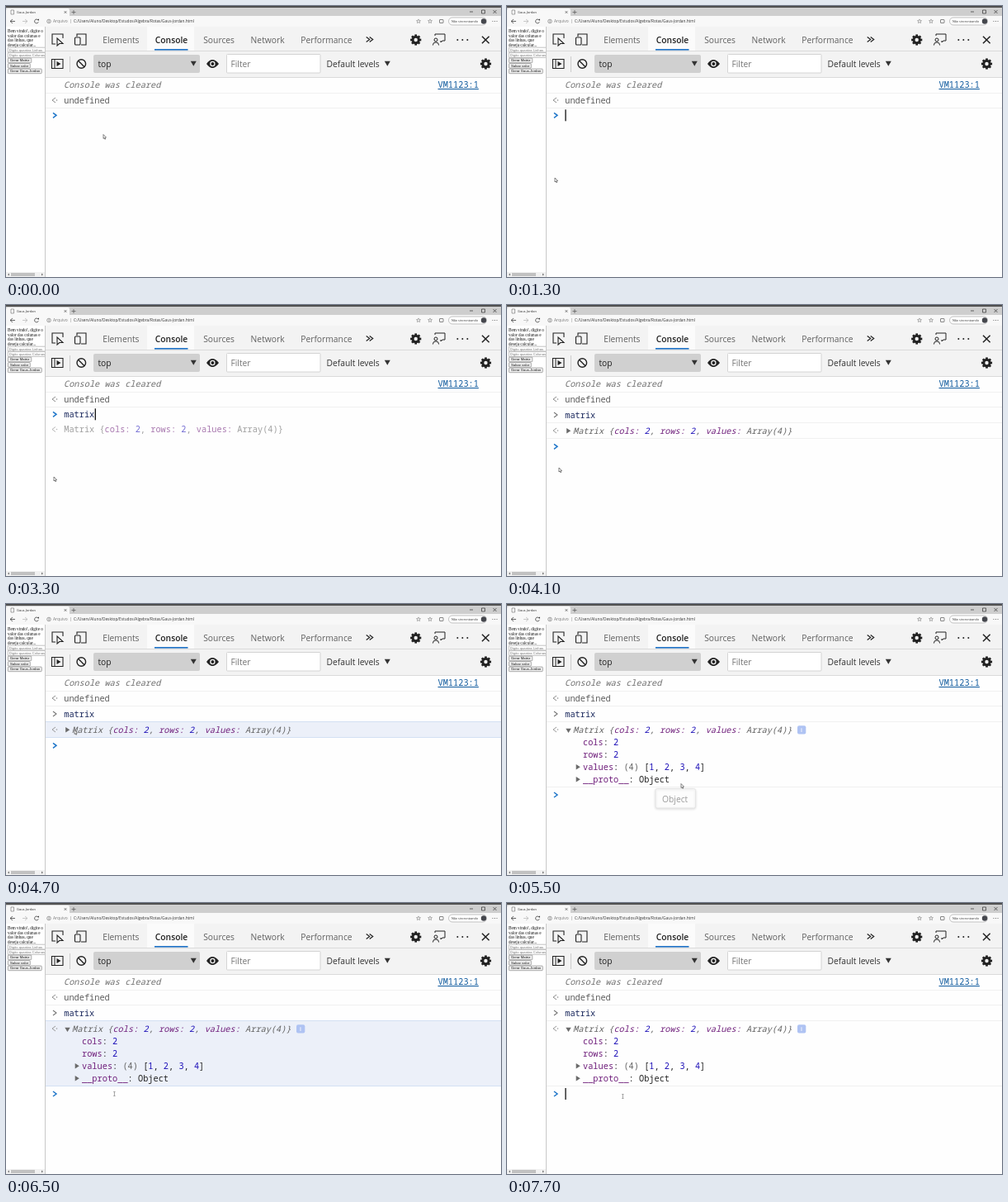
These frames come from a looping animation (600x328 px, 8 s). An HTML page with a canvas:

```html
<!DOCTYPE html>
<html lang="pt">
<head>
<meta charset="utf-8">
<title>Console</title>
<style>
html, body { margin: 0; width: 100%; height: 100%; overflow: hidden; background: #fff; }
canvas { display: block; width: 600px; height: 328px; }
</style>
</head>
<body>
<canvas id="stage" width="600" height="328"></canvas>
<script>
const ctx = document.getElementById('stage').getContext('2d');
const LOOP = 8000;
const SANS = '"Open Sans", "Noto Sans", sans-serif';
const FORM = '4.2px "Liberation Sans", sans-serif';
const SERIF = '5.2px "Liberation Serif", serif';
const MONO = '10.3px "Noto Sans Mono", "DejaVu Sans Mono", monospace';
const GREY = '#626262', DARK = '#222', PURPLE = '#70207c', BLUE = '#1d10b8';
const PROMPT = '#1f76c9', LINK = '#0f5a9e';

function rect(x, y, w, h, color) {
  ctx.fillStyle = color;
  ctx.fillRect(x, y, w, h);
}

function box(x, y, w, h, r, fill, stroke, width = 1) {
  ctx.beginPath();
  ctx.roundRect(x, y, w, h, r);
  if (fill) { ctx.fillStyle = fill; ctx.fill(); }
  if (stroke) { ctx.strokeStyle = stroke; ctx.lineWidth = width; ctx.stroke(); }
}

function line(points, color, width = 1, close = false) {
  ctx.beginPath();
  points.forEach(([x, y]) => ctx.lineTo(x, y));
  if (close) ctx.closePath();
  ctx.strokeStyle = color;
  ctx.lineWidth = width;
  ctx.stroke();
}

function poly(points, color) {
  ctx.beginPath();
  points.forEach(([x, y]) => ctx.lineTo(x, y));
  ctx.fillStyle = color;
  ctx.fill();
}

function circle(x, y, r, fill, stroke, width = 1) {
  ctx.beginPath();
  ctx.arc(x, y, r, 0, Math.PI * 2);
  if (fill) { ctx.fillStyle = fill; ctx.fill(); }
  if (stroke) { ctx.strokeStyle = stroke; ctx.lineWidth = width; ctx.stroke(); }
}

function text(str, x, y, font, color) {
  ctx.font = font;
  ctx.fillStyle = color;
  ctx.fillText(str, x, y);
  return x + ctx.measureText(str).width;
}

const mono = (str, x, y, color, italic) => text(str, x, y, (italic ? 'italic ' : '') + MONO, color);

function spans(x, y, parts, italic) {
  for (const [str, color] of parts) x = mono(str, x, y, color, italic);
  return x;
}

function cross(x, y, r, color, width) {
  line([[x - r, y - r], [x + r, y + r]], color, width);
  line([[x + r, y - r], [x - r, y + r]], color, width);
}

function gear(x, y) {
  for (let i = 0; i < 4; i++) {
    const a = i * Math.PI / 4, dx = Math.cos(a) * 6.6, dy = Math.sin(a) * 6.6;
    line([[x - dx, y - dy], [x + dx, y + dy]], DARK, 2.7);
  }
  circle(x, y, 5.2, DARK);
  circle(x, y, 2.2, '#f3f3f3');
}

function chevron(x, y, color, width = 1.1, dir = 1) {
  line([[x - 2 * dir, y - 3], [x + 2 * dir, y], [x - 2 * dir, y + 3]], color, width);
}

function resultMark(y, color) {
  chevron(58, y, color, 1, -1);
  circle(61.5, y, 0.8, color);
}

function triangle(x, y, open) {
  poly(open ? [[x - 3.2, y - 2.3], [x + 3.2, y - 2.3], [x, y + 3]]
            : [[x - 2.3, y - 3.2], [x + 2.8, y], [x - 2.3, y + 3.2]], '#6a6a6a');
}

function dropArrow(x, y) {
  poly([[x - 3.5, y - 3], [x + 3.5, y - 3], [x, y + 3]], '#333');
}

function divider(y, color = '#f0f0f0') { rect(48, y, 552, 1, color); }

function drawBrowser() {
  rect(0, 0, 600, 12, '#cecece');
  rect(0, 0, 600, 2, '#505050');
  box(0, 3, 77, 10, [2, 2, 0, 0], '#f8f8f8');
  box(6, 5, 3.5, 5, 0, '#fff', '#666', 0.6);
  text('Gaus-Jordan', 13, 9.3, '4px ' + SANS, '#333');
  cross(72, 7.5, 1.3, '#444', 0.7);
  line([[79.5, 7.5], [84.5, 7.5]], '#555', 0.7);
  line([[82, 5], [82, 10]], '#555', 0.7);
  line([[562, 7], [566, 7]], '#333', 0.7);
  box(576.5, 5, 4, 4, 0, null, '#333', 0.7);
  cross(592.5, 7, 2, '#333', 0.7);

  rect(0, 12, 600, 13, '#f8f8f8');
  for (const [x, dir, color] of [[8, 1, '#444'], [23, -1, '#bbb']]) {
    line([[x - 3, 18.5], [x + 3, 18.5]], color, 0.8);
    line([[x, 16], [x - 3 * dir, 18.5], [x, 21]], color, 0.8);
  }
  ctx.beginPath();
  ctx.arc(37, 18.5, 2.4, 0.3, 5.6);
  ctx.strokeStyle = '#444';
  ctx.lineWidth = 0.8;
  ctx.stroke();
  poly([[37.7, 16.8], [40, 15.4], [40, 17.8]], '#444');
  circle(52, 18.5, 2.3, null, '#666', 0.6);
  rect(51.7, 17.2, 0.7, 2.6, '#666');
  text('Arquivo', 57, 20.2, '4.9px ' + SANS, '#777');
  rect(78, 16, 0.6, 5, '#aaa');
  text('C:/Users/Aluno/Desktop/Estudos/Algebra/Rotas/Gaus-Jordan.html', 82, 20.2, '4.75px ' + SANS, '#333');

  const star = (x, y, r) => line(Array.from({ length: 10 }, (_, i) => {
    const a = -Math.PI / 2 + i * Math.PI / 5, k = i % 2 ? r * 0.45 : r;
    return [x + Math.cos(a) * k, y + Math.sin(a) * k];
  }), '#666', 0.5, true);
  star(500, 18.5, 2.6);
  star(514, 18.5, 2.6);
  box(525.5, 16.5, 4.5, 4, 0.5, null, '#555', 0.7);
  box(536.5, 14, 46, 9, 4.5, '#fff', '#999', 0.6);
  text('Não sincronizando', 540, 19.9, '3.7px ' + SANS, '#333');
  circle(579, 18.5, 3.2, '#45474d');
  for (const x of [590, 592.5, 595]) circle(x, 18.5, 0.5, '#444');
}

function drawPage() {
  ctx.save();
  ctx.beginPath();
  ctx.rect(0, 25, 47, 303);
  ctx.clip();
  rect(0, 25, 47, 303, '#fff');
  ['Bem vindo!, digite o', 'valor das colunas e', 'das linhas, que', 'deseja calcular...']
    .forEach((str, i) => text(str, 2, 32 + i * 5.6, SERIF, '#111'));
  ['Digito quantas Linhas', 'Digito quantas Colunas'].forEach((str, i) => {
    const y = 50.2 + i * 6.4;
    box(2.3, y, 60, 5.8, 0, '#fff', '#999', 0.6);
    text(str, 3.8, y + 4.4, FORM, '#777');
  });
  [['Gerar Matriz', 28.5], ['Salvar valor', 27], ['Gerar Gaus-Jordan', 41]].forEach(([str, w], i) => {
    const y = 63.1 + i * 6.5;
    box(2.3, y, w, 5.6, 1, '#efefef', '#777', 0.6);
    text(str, 5, y + 4.3, FORM, '#111');
  });
  rect(0, 322, 47, 6, '#f1f1f1');
  rect(6, 323, 29, 4, '#c1c1c1');
  poly([[2, 325], [4, 323.5], [4, 326.5]], '#777');
  poly([[45, 325], [43, 323.5], [43, 326.5]], '#777');
  ctx.restore();
  rect(47, 25, 1, 303, '#c9c9c9');
}

function drawToolbars() {
  rect(48, 25, 552, 61, '#f3f3f3');
  rect(171, 25, 57, 29, '#fbfbfb');
  rect(48, 54, 552, 1, '#dadada');
  rect(48, 86, 552, 1, '#dadada');
  rect(180, 52, 40.5, 1.6, '#1a6fc4');

  line([[60, 46], [56, 46], [56, 34], [69, 34], [69, 39]], DARK, 1.1);
  line([[62, 39], [62, 48], [64.8, 45.5], [69, 45.5]], DARK, 1.1, true);
  line([[86, 37], [86, 34], [97, 34], [97, 47], [91, 47]], DARK, 1.1);
  box(83.5, 38, 6.5, 9, 1, null, DARK, 1.1);

  const tabFont = '10.3px ' + SANS;
  [['Elements', 117.2], ['Sources', 239.2], ['Network', 296.6], ['Performance', 357.2]]
    .forEach(([str, x]) => text(str, x, 44.8, tabFont, '#606060'));
  text('Console', 180.8, 44.8, '600 ' + tabFont, DARK);
  for (const x of [438.7, 442.7]) chevron(x, 40.5, DARK, 1.2);

  gear(496.7, 41);
  circle(521, 41, 2, null, DARK);
  ctx.beginPath();
  ctx.arc(521, 47.5, 3.6, Math.PI, 0);
  ctx.stroke();
  line([[520, 36], [520, 34], [532, 34], [532, 42], [529, 42], [527, 44], [527, 42]], DARK);
  for (const x of [547.3, 553.3, 559.3]) circle(x, 41, 1, DARK);
  cross(581.3, 41, 4.3, DARK, 1.5);

  box(55.5, 64.5, 13.5, 11, 0, null, DARK, 1.1);
  rect(58.5, 64.5, 1, 11, DARK);
  poly([[61.5, 67], [66.5, 70], [61.5, 73]], DARK);
  rect(77, 61, 1, 19, '#ccc');
  circle(91.3, 70, 5.3, null, DARK, 1.4);
  line([[87.6, 66.3], [95, 73.7]], DARK, 1.4);

  box(106, 59, 129, 22, 2, '#d0d0d0');
  text('top', 111.4, 74, tabFont, DARK);
  dropArrow(227.3, 69.8);
  ctx.beginPath();
  ctx.moveTo(243, 70);
  ctx.quadraticCurveTo(250, 60, 258, 70);
  ctx.quadraticCurveTo(250, 80, 243, 70);
  ctx.fillStyle = DARK;
  ctx.fill();
  circle(250.4, 70, 3.2, '#f3f3f3');
  circle(250.4, 70, 1.9, DARK);
  box(267.5, 58.5, 113.5, 22.5, 1, '#fff', '#d4d4d4');
  text('Filter', 272.4, 74, tabFont, '#757575');
  text('Default levels', 388.4, 74, tabFont, '#333');
  dropArrow(462.3, 69.8);
  gear(581.5, 70);
}

const summary = [
  ['Matrix {', GREY], ['cols:', PURPLE], [' ', GREY], ['2', BLUE], [', ', GREY], ['rows:', PURPLE],
  [' ', GREY], ['2', BLUE], [', ', GREY], ['values:', PURPLE], [' Array(4)}', GREY],
];

function drawDetails() {
  triangle(74.5, 153, true);
  box(352, 147.3, 10.3, 10.3, 2, '#afc3f3');
  text('i', 356, 155.4, '600 7px ' + SANS, '#fff');
  spans(92, 170.8, [['cols', PURPLE], [': ', DARK], ['2', BLUE]]);
  spans(92, 185.8, [['rows', PURPLE], [': ', DARK], ['2', BLUE]]);
  triangle(86, 197.3);
  spans(92, 201.1, [['values', PURPLE], [': ', DARK], ['(4)', GREY], [' [', DARK], ['1', BLUE], [', ', DARK],
    ['2', BLUE], [', ', DARK], ['3', BLUE], [', ', DARK], ['4', BLUE], [']', DARK]]);
  triangle(86, 212.3);
  spans(92, 216, [['__proto__', PURPLE], [': Object', DARK]]);
}

const within = (t, ...spansMs) => spansMs.some(([a, b]) => t >= a && t < b);
const keyTimes = [2100, 2200, 2300, 2700, 2800, 3000];

function drawConsole(t, promptY) {
  rect(48, 87, 552, 241, '#fefefe');
  mono('Console was cleared', 70, 99, '#707070', true);
  const linkEnd = mono('VM1123:1', 523.5, 99, LINK);
  rect(523.5, 100, linkEnd - 523.5, 1, LINK);
  divider(105);
  resultMark(114, '#8a8a8a');
  mono('undefined', 70.2, 118, '#5c5c5c');
  divider(123);

  const evaluated = t >= 3400, expanded = t >= 4800;
  let caretX = 71;
  if (evaluated) {
    chevron(59, 133, '#777');
    mono('matrix', 70.2, 137, '#1c2a5e');
    const bottom = expanded ? 221 : 161;
    const hover = within(t, [4500, 5400], [5800, 6600]);
    if (hover) rect(48, 142, 552, bottom - 142, '#ecf0f9');
    divider(142, hover ? '#d3e0f3' : undefined);
    divider(bottom, hover ? '#d3e0f3' : undefined);
    resultMark(152, '#999');
    spans(80, 155.8, summary, true);
    if (expanded) drawDetails(); else triangle(74.5, 152.3);
  } else {
    const typed = 'matrix'.slice(0, keyTimes.filter(k => t >= k).length);
    const end = mono(typed, 70.2, 136.3, '#1c2a5e');
    if (typed) caretX = end + 1;
    if (t >= 3100) {
      ctx.globalAlpha = 0.6;
      resultMark(150.5, '#888');
      spans(70.2, 154.3, summary);
      ctx.globalAlpha = 1;
    }
  }
  chevron(59, promptY, PROMPT, 1.5);
  if (within(t, [1200, 1700], [2100, 3900], [6700, 7200], [7700, LOOP])) {
    rect(caretX - 0.6, promptY - 7, 1.3, 14, '#111');
  }
}

function drawTooltip(t) {
  if (!within(t, [5300, 5600])) return;
  const fading = t >= 5500;
  ctx.save();
  ctx.shadowColor = 'rgba(0,0,0,.12)';
  ctx.shadowBlur = 3;
  ctx.shadowOffsetY = 1;
  box(180, 223.5, 48.5, 23.5, 2, '#fcfcfc', fading ? '#e6e6e6' : '#dcdcdc');
  ctx.restore();
  text('Object', 188, 239.5, '10.3px ' + SANS, fading ? '#9c9c9c' : '#666');
}

// time, x, y
const path = [
  [0, 118, 155.5], [100, 118, 155.5], [900, 98, 140], [1000, 98, 140], [1300, 58, 208], [3900, 58, 208],
  [4600, 83, 152.5], [4900, 83, 152.5], [5500, 211, 217.5], [5700, 208, 215], [6400, 131, 231],
  [6600, 131, 231], [7300, 140, 234], [LOOP, 140, 234],
];

function pointerAt(t) {
  const i = path.findIndex(([time]) => time > t);
  const [t0, x0, y0] = path[i - 1], [t1, x1, y1] = path[i];
  const p = (t - t0) / (t1 - t0), e = p * p * (3 - 2 * p);
  return [x0 + (x1 - x0) * e, y0 + (y1 - y0) * e];
}

function drawPointer(t, promptY) {
  const [x, y] = pointerAt(t);
  if (x > 66 && Math.abs(y - promptY) < 9) {
    const cx = x + 0.4;
    line([[cx, y - 2.5], [cx, y + 2.5]], '#777', 0.7);
    for (const dy of [-2.5, 2.5]) line([[cx - 1.2, y + dy], [cx + 1.2, y + dy]], '#777', 0.6);
    return;
  }
  const arrow = [[0, 0], [0, 5], [1.1, 4], [1.9, 5.8], [2.7, 5.4], [2, 3.7], [3.5, 3.6]]
    .map(([dx, dy]) => [x + dx, y + dy]);
  poly(arrow, '#fff');
  line(arrow, '#333', 0.6, true);
}

function render(now) {
  const t = Math.floor((now % LOOP) / 100) * 100;
  const promptY = t < 3400 ? 132.3 : t < 4800 ? 171.3 : 231;
  drawConsole(t, promptY);
  drawToolbars();
  drawBrowser();
  drawPage();
  drawTooltip(t);
  drawPointer(t, promptY);
}

const start = performance.now();
function tick() {
  render(performance.now() - start);
  requestAnimationFrame(tick);
}
tick();
</script>
</body>
</html>
```
